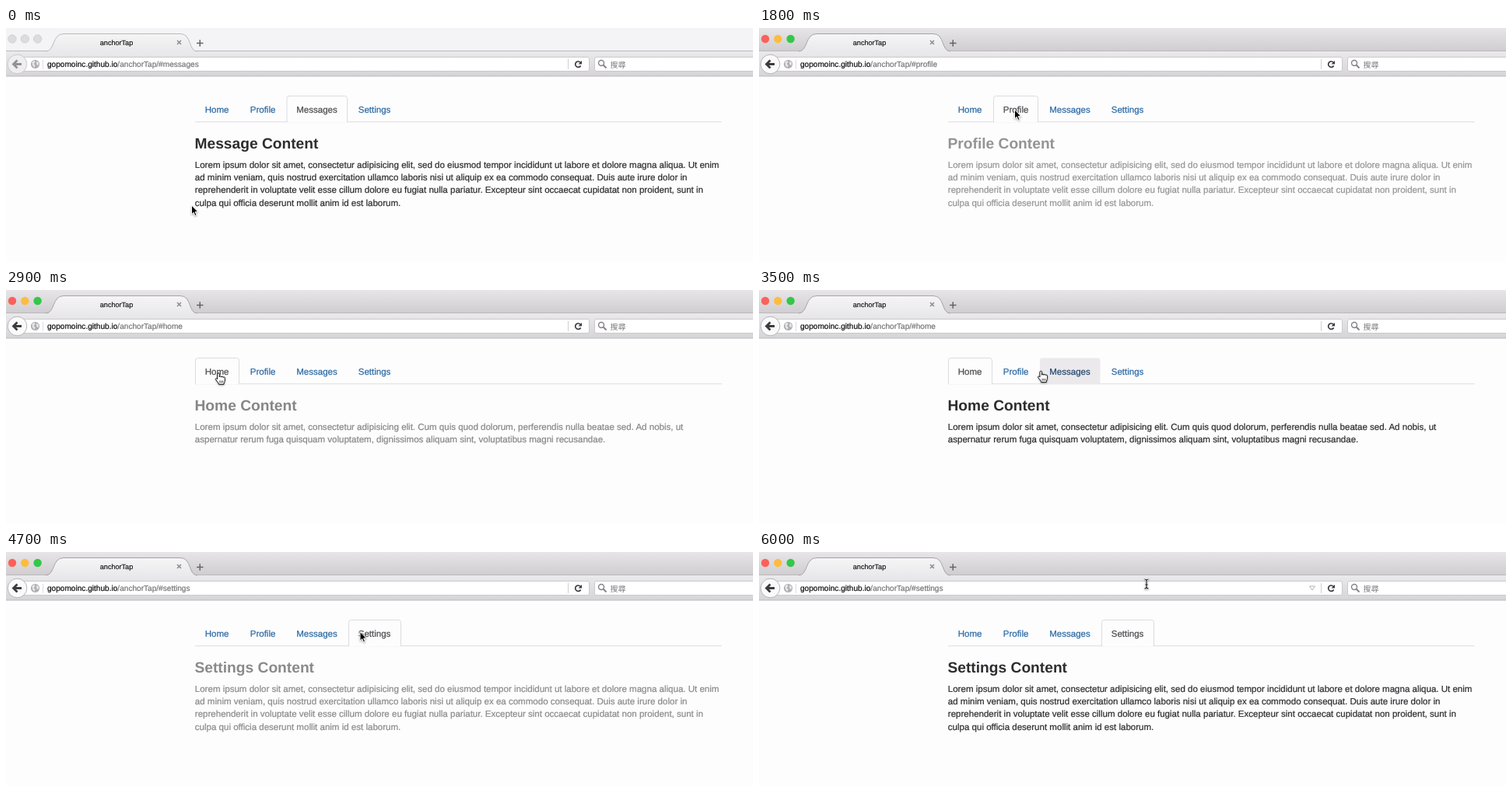
Write an HTML page that moves like this. It is 960 by 301 pixels and loops after 6.1 s.

```html
<!DOCTYPE html>
<html lang="en">
<head>
<meta charset="utf-8">
<title>anchorTap</title>
<style>
  html, body { margin: 0; width: 100%; height: 100%; overflow: hidden; background: #fefdfe; }
  svg { display: block; width: 960px; height: 301px; text-rendering: geometricPrecision;
        font: 11.54px "Liberation Sans", Arial, sans-serif; }
  text { white-space: pre; fill: currentColor; stroke: currentColor; stroke-width: .22px; }
  .title { font-size: 9.1px; color: #1c1b1d; }
  .url { font-size: 10.1px; color: #111; }
  .url .path { color: #777; fill: currentColor; stroke: currentColor; }
  .search { font: 10px "Noto Sans CJK TC", "Noto Sans CJK", sans-serif; color: #7c7a7d; stroke: none; }
  .box { fill: none; stroke: none; }
  .tab { color: #2a69a3; }
  .tab.hover { color: #23476f; }
  .tab.hover .box { fill: #ebe9ec; }
  .tab.active { color: #4c4a4d; }
  .tab.active .box { fill: #fefdfe; stroke: #dcdade; }
  #pane { color: #2e2d2f; }
  #heading { font-size: 19.2px; font-weight: bold; stroke: none; }
  .cursor { visibility: hidden; filter: drop-shadow(0 1px .8px rgba(0, 0, 0, .35)); }
</style>
</head>
<body>
<svg viewBox="0 0 960 301">
  <defs>
    <linearGradient id="bar" x2="0" y2="1">
      <stop stop-color="#e7e5e8"/><stop offset="1" stop-color="#cfcdd0"/>
    </linearGradient>
    <linearGradient id="tool" x2="0" y2="1">
      <stop stop-color="#eae9eb"/><stop offset="1" stop-color="#d6d4d7"/>
    </linearGradient>
    <linearGradient id="tabFill" x2="0" y2="1">
      <stop stop-color="#f6f5f6"/><stop offset="1" stop-color="#eae9eb"/>
    </linearGradient>
  </defs>

  <rect width="960" height="301" fill="#fefdfe"/>
  <rect id="titlebar" width="960" height="30"/>
  <rect y="30" width="960" height="32" fill="url(#tool)"/>
  <path d="M0 29.500H960M0 62H960" stroke="#bab8bb" fill="none"/>
  <path id="browserTab" d="M51 30C63 30 59 7.500 74 7.500H224C239 7.500 234 30 246 30" fill="url(#tabFill)"/>
  <g id="lights">
    <circle cx="8" cy="14" r="5.200"/><circle cx="24.300" cy="14" r="5.200"/><circle cx="40.600" cy="14" r="5.200"/>
  </g>
  <text class="title" x="142" y="22" text-anchor="middle">anchorTap</text>
  <path d="M220 16l5 5m0-5l-5 5" stroke="#8c8a8d" stroke-width="1.500"/>
  <path d="M245 19.500h8.500m-4.250-4.250v8.500" stroke="#666467" stroke-width="1.500"/>

  <rect x="20.500" y="37.500" width="729" height="18" rx="2.500" fill="#fff" stroke="#cbc9cc"/>
  <circle id="backDisc" cx="14.500" cy="46.500" r="12.300"/>
  <path id="back" d="M20 46.500H10.500M14.500 41.500l-5 5 5 5" fill="none" stroke-width="2.800"/>
  <circle cx="37.500" cy="46.500" r="5.600" fill="#b0aeb1"/>
  <path d="M33.500 43.500l3-1.500 1 2-2 2 2 2-1 3-2.500-3zM39.500 42.500l2.500 2-.500 4-2.500-2z" fill="#e8e7e9"/>
  <path d="M47.500 41v12" stroke="#dddbde"/>
  <text class="url" x="53" y="50.300">gopomoinc.github.io<tspan class="path" id="path"></tspan></text>
  <path id="drop" d="M707.500 44h7l-3.500 5z" fill="none" stroke="#b5b3b6"/>
  <path d="M722.500 40v13" stroke="#d0ced1"/>
  <path d="M738.200 44.300A3.700 3.700 0 1 0 738.600 48.500" fill="none" stroke="#3c3a3d" stroke-width="1.700"/>
  <path d="M740 42v4.500h-4.500z" fill="#3c3a3d"/>
  <rect x="756.500" y="37.500" width="210" height="18" rx="2.500" fill="#fff" stroke="#cbc9cc"/>
  <circle cx="765" cy="45" r="3.500" fill="none" stroke="#858385" stroke-width="1.400"/>
  <path d="M767.500 47.500l4 4" stroke="#858385" stroke-width="1.900"/>
  <text class="search" x="776.500" y="50.500">搜尋</text>

  <path d="M243 120.800H920" stroke="#dcdade"/>
  <g id="tabs"></g>
  <g id="pane"><text id="heading" x="242.500" y="155.300"></text><g id="lines"></g></g>

  <g class="cursor" id="arrow">
    <path d="M0 0V11.800L2.700 9.300 4.500 13.500 6.500 12.700 4.700 8.500H8.300Z" stroke="#fff" stroke-width="1"/>
  </g>
  <g class="cursor" id="hand" stroke="#111" stroke-width="1" stroke-linejoin="round">
    <path fill="#fff" d="M-1.300 1.200a1.300 1.300 0 0 1 2.600 0V5a1.200 1.200 0 0 1 2.500 .2a1.200 1.200 0 0 1 2.400 .4a1.100 1.100 0 0 1 2.100 .6V9C8.300 11 7 12 7 14.300H.5C.3 12.500-1.500 11-3.500 8.200C-4.300 7-2.800 6-1.300 7.600Z"/>
    <path d="M1.800 9.500v3M3.700 9.500v3M5.600 9.500v3" stroke-width=".7"/>
  </g>
  <g class="cursor" id="beam" fill="none">
    <path d="M-2.500-6q2 0 2.500 1.500q.5-1.500 2.500-1.500M0-4.500V4.500M-2.500 6q2 0 2.500-1.500q.5 1.500 2.500 1.500M-1.500 1h3" stroke="#fff" stroke-width="2.400"/>
    <path d="M-2.500-6q2 0 2.500 1.500q.5-1.500 2.500-1.500M0-4.500V4.500M-2.500 6q2 0 2.500-1.500q.5 1.500 2.500 1.500M-1.500 1h3" stroke="#111" stroke-width="1.100"/>
  </g>
</svg>
<script>
const LOOP = 6100, STEP = 100, FADE = 150, FOCUS = 800;
const $ = id => document.getElementById(id);

const lorem = [
  'Lorem ipsum dolor sit amet, consectetur adipisicing elit, sed do eiusmod tempor incididunt ut labore et dolore magna aliqua. Ut enim',
  'ad minim veniam, quis nostrud exercitation ullamco laboris nisi ut aliquip ex ea commodo consequat. Duis aute irure dolor in',
  'reprehenderit in voluptate velit esse cillum dolore eu fugiat nulla pariatur. Excepteur sint occaecat cupidatat non proident, sunt in',
  'culpa qui officia deserunt mollit anim id est laborum.'
];
const homeText = [
  'Lorem ipsum dolor sit amet, consectetur adipisicing elit. Cum quis quod dolorum, perferendis nulla beatae sed. Ad nobis, ut',
  'aspernatur rerum fuga quisquam voluptatem, dignissimos aliquam sint, voluptatibus magni recusandae.'
];
const tabs = [
  { name: 'Home', x: 243.5, w: 56, title: 'Home Content', text: homeText },
  { name: 'Profile', x: 301.5, w: 57, title: 'Profile Content', text: lorem },
  { name: 'Messages', x: 361, w: 77.5, title: 'Message Content', text: lorem },
  { name: 'Settings', x: 440.5, w: 67, title: 'Settings Content', text: lorem }
];

// [time, tab index]
const clicks = [[-1000, 2], [1575, 1], [2665, 0], [3610, 2], [4467, 3]];
// [start, end, x, y]
const moves = [
  [0, 0, 238.5, 228], [100, 800, 318.5, 111.5], [1000, 1800, 328.5, 105],
  [1950, 2550, 273, 107], [2950, 3850, 407.5, 103],
  [3950, 4650, 455, 102.5], [5000, 5700, 498, 41]
];

const svgNode = (tag, attrs, parent, text = '') => {
  const el = document.createElementNS('http://www.w3.org/2000/svg', tag);
  for (const key in attrs) el.setAttribute(key, attrs[key]);
  el.textContent = text;
  return parent.appendChild(el);
};

const paint = (el, fill, stroke) => {
  el.setAttribute('fill', fill);
  el.setAttribute('stroke', stroke);
};

for (const tab of tabs) {
  const { x, w } = tab, r = x + w;
  tab.el = svgNode('g', { class: 'tab' }, $('tabs'));
  svgNode('path', { class: 'box', d: `M${x} 121.3V90.5q0-3 3-3H${r - 3}q3 0 3 3V121.3` }, tab.el);
  svgNode('text', { x: x + 12.2, y: 109 }, tab.el, tab.name);
}
const lines = lorem.map((_, i) => svgNode('text', { x: 242.8, y: 179.5 + i * 16.35 }, $('lines')));

const lastClick = t => clicks.findLastIndex(c => c[0] <= t);

function pointer(t) {
  const i = moves.findLastIndex(m => m[0] <= t);
  const [start, end, x, y] = moves[i], [, , x0, y0] = moves[Math.max(0, i - 1)];
  const p = end > start ? Math.min(1, (t - start) / (end - start)) : 1;
  const e = p * p * (3 - 2 * p);
  return { x: x0 + (x - x0) * e, y: y0 + (y - y0) * e, movedAt: Math.min(t, end) };
}

function cursorShape(focused, over, x, y, movedAt) {
  if (!focused) return 'arrow';
  // the shape only refreshes while the mouse moves
  if (over >= 0 && over !== clicks[lastClick(movedAt)][1]) return 'hand';
  return y > 37 && y < 56 && x > 47 && x < 722 ? 'beam' : 'arrow';
}

function drawWindow(focused) {
  $('titlebar').setAttribute('fill', focused ? 'url(#bar)' : '#f4f3f5');
  $('browserTab').setAttribute('stroke', focused ? '#a5a3a6' : '#bbb9bc');
  $('back').setAttribute('stroke', focused ? '#3c3a3d' : '#929093');
  paint($('backDisc'), focused ? '#fbfafb' : '#efeef0', focused ? '#b5b3b6' : '#cbc9cc');
  ['#fc605b', '#fdbc40', '#34c749'].forEach((color, i) =>
    paint($('lights').children[i], focused ? color : '#dddbde', focused ? 'none' : '#d3d1d4'));
}

function draw(t) {
  const focused = t >= FOCUS;
  drawWindow(focused);

  const c = lastClick(t), [clicked, active] = clicks[c];
  const since = t - clicked, leaving = since < FADE;
  const shown = tabs[leaving ? clicks[c - 1][1] : active];
  $('pane').setAttribute('opacity', leaving ? 1 - since / FADE : Math.min(1, since / FADE - 1));
  $('heading').textContent = shown.title;
  lines.forEach((line, i) => line.textContent = shown.text[i] || '');
  $('path').textContent = '/anchorTap/#' + tabs[active].name.toLowerCase();

  const { x, y, movedAt } = pointer(t);
  const over = tabs.findIndex(tab => x >= tab.x && x <= tab.x + tab.w && y > 87 && y < 121);
  tabs.forEach((tab, i) => {
    tab.el.classList.toggle('active', i === active);
    tab.el.classList.toggle('hover', focused && i === over && i !== active);
  });

  const shape = cursorShape(focused, over, x, y, movedAt);
  for (const id of ['arrow', 'hand', 'beam']) {
    $(id).style.visibility = id === shape ? 'visible' : 'hidden';
    $(id).setAttribute('transform', `translate(${x} ${y})`);
  }
  $('drop').style.visibility = shape === 'beam' ? 'visible' : 'hidden';
}

const origin = performance.now();
function tick() {
  const t = (performance.now() - origin) % LOOP;
  draw(Math.floor(t / STEP) * STEP);
  requestAnimationFrame(tick);
}
tick();
</script>
</body>
</html>
```
